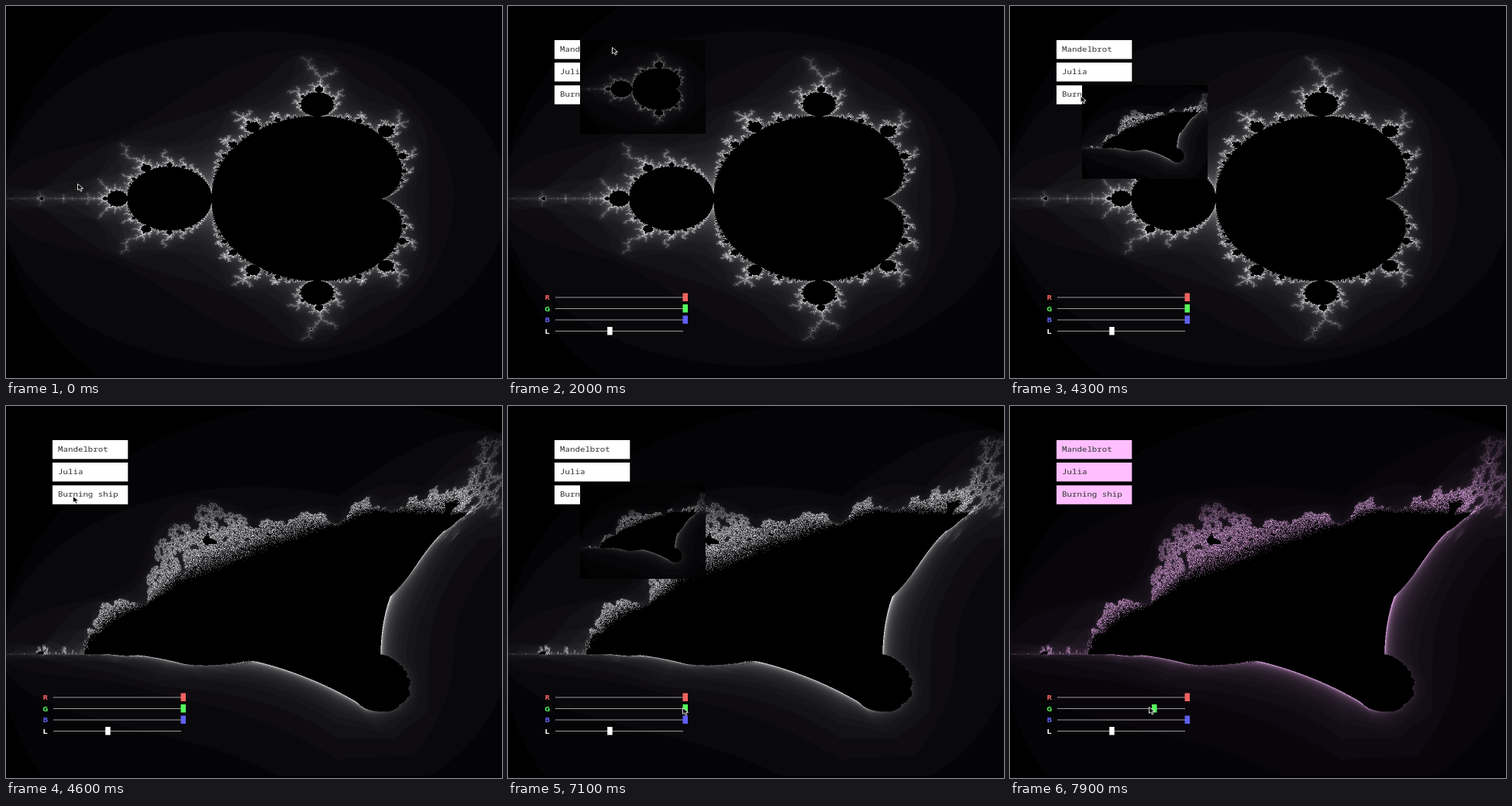
These frames come from a looping animation (640 px wide and 480 px high, 8000 ms). An HTML page with a canvas:

```html
<!DOCTYPE html>
<html lang="en">
<head>
<meta charset="utf-8">
<title>Fractal explorer</title>
<style>
html, body { margin: 0; width: 100%; height: 100%; overflow: hidden; background: #000; }
canvas { display: block; width: 640px; height: 480px; }
</style>
</head>
<body>
<canvas id="stage" width="640" height="480"></canvas>
<script>
const W = 640, H = 480, LOOP = 8000, STEP = 100;
const MAX_ITER = 80, GAIN = 4.5, SAMPLES = 2;
const SCALE_X = 217.7, SCALE_Y = 163.3;
const ASPECT = 4 / 3; // the interface is laid out in 4:3 pixels
const THUMB = { x: 93, w: 162, h: 121 };

const ctx = document.getElementById('stage').getContext('2d');

const FRACTALS = {
  mandelbrot: { label: 'Mandelbrot', top: 44, x0: 428.5, y0: 248.2 },
  julia: { label: 'Julia', top: 73, x0: 320, y0: 239, c: [-0.7, 0.27015] },
  ship: { label: 'Burning ship', top: 102.4, x0: 428.5, y0: 320.2, fold: true }
};

function escapeTime(f, px, py) {
  let x = (px - f.x0) / SCALE_X, y = (py - f.y0) / SCALE_Y;
  const [cx, cy] = f.c || [x, y];
  for (let n = 0; n < MAX_ITER; n++) {
    const xx = x * x, yy = y * y;
    if (xx + yy > 4) return n;
    const xy = 2 * x * y;
    x = xx - yy + cx;
    y = (f.fold ? Math.abs(xy) : xy) + cy;
  }
  return 0;
}

// Mean brightness of one pixel that covers zoom x zoom stage units.
function shade(f, x, y, zoom) {
  let sum = 0;
  for (let j = 0; j < SAMPLES; j++) {
    for (let i = 0; i < SAMPLES; i++) {
      const n = escapeTime(f, (x + i / SAMPLES) * zoom, (y + j / SAMPLES) * zoom);
      sum += Math.min(255, GAIN * n);
    }
  }
  return sum / SAMPLES ** 2;
}

function render(f, w, h) {
  const canvas = document.createElement('canvas');
  canvas.width = w;
  canvas.height = h;
  const g = canvas.getContext('2d');
  const img = g.createImageData(w, h);
  for (let y = 0, i = 0; y < h; y++) {
    for (let x = 0; x < w; x++, i += 4) {
      const v = shade(f, x, y, W / w);
      img.data[i] = v;
      img.data[i + 1] = v - 1;
      img.data[i + 2] = v && v + 2;
      img.data[i + 3] = 255;
    }
  }
  g.putImageData(img, 0, 0);
  return canvas;
}

const full = {
  mandelbrot: render(FRACTALS.mandelbrot, W, H),
  ship: render(FRACTALS.ship, W, H)
};
const thumbs = {};
for (const key in FRACTALS) thumbs[key] = render(FRACTALS[key], THUMB.w, THUMB.h);

// [time, x, y]
const CURSOR = [
  [0, 92, 229], [500, 93, 228], [700, 104, 122], [900, 130, 92], [1100, 142, 79],
  [1400, 143, 78], [1600, 138, 66], [2000, 134, 53], [2200, 134, 54], [2500, 130, 75],
  [3000, 125, 94], [3300, 123, 113], [3600, 123, 115], [4400, 86, 116], [5200, 86, 116],
  [5500, 200, 366], [5700, 202, 367], [6100, 229, 382], [6500, 225, 389],
  [7200, 225, 389], [7900, 179, 388]
];

// [time, preview shown from then on]
const HOVER = [
  [0, null], [600, 'ship'], [800, 'julia'], [1600, 'mandelbrot'], [2500, 'julia'],
  [3200, 'ship'], [4600, null], [5300, 'ship'], [7400, null]
];
const SELECT_AT = 4600;
const DRAG = { from: 7200, to: 7900, x0: 228.5, x1: 186 };

const clamp = v => Math.max(0, Math.min(1, v));
const mix = (a, b, k) => a + (b - a) * k;

function cursorAt(t) {
  let i = 0;
  while (i < CURSOR.length - 2 && CURSOR[i + 1][0] <= t) i++;
  const [ta, xa, ya] = CURSOR[i], [tb, xb, yb] = CURSOR[i + 1];
  const k = clamp((t - ta) / (tb - ta));
  return [mix(xa, xb, k), mix(ya, yb, k)];
}

function label(text, x, y, color, font) {
  ctx.save();
  ctx.translate(x, y);
  ctx.scale(ASPECT, 1);
  ctx.font = font + ' "Noto Sans Mono", "DejaVu Sans Mono", monospace';
  ctx.textBaseline = 'alphabetic';
  ctx.fillStyle = color;
  ctx.fillText(text, 0, 0);
  ctx.restore();
}

function drawButtons(tint) {
  for (const key in FRACTALS) {
    const { label: text, top } = FRACTALS[key];
    ctx.fillStyle = tint;
    ctx.fillRect(60, top, 97.3, 24.4);
    label(text, 67, top + 14.5, '#333', '500 8.1px');
  }
}

function drawSlider(name, y, x, color) {
  label(name, 47.5, y + 3.2, color, 'bold 8.3px');
  ctx.fillStyle = '#999';
  ctx.fillRect(61, y - 0.5, 165, 1);
  ctx.fillStyle = color;
  ctx.fillRect(x - 3, y - 5.5, 6.5, 10.5);
}

function drawThumb(key, selected) {
  const top = Math.floor(FRACTALS[key].top);
  ctx.drawImage(thumbs[key], THUMB.x, top);
  if (key === selected) {
    ctx.fillStyle = 'rgba(0,0,0,0.3)';
    ctx.fillRect(THUMB.x, top, THUMB.w, THUMB.h);
  }
}

function drawCursor(x, y) {
  ctx.save();
  ctx.translate(x + 0.5, y + 0.5);
  ctx.beginPath();
  [[0, 0], [0, 8], [2.2, 6.4], [3.8, 9.6], [5.4, 9], [4, 6], [7, 5.8]]
    .forEach(p => ctx.lineTo(...p));
  ctx.closePath();
  ctx.fillStyle = '#000';
  ctx.fill();
  ctx.strokeStyle = '#ddd';
  ctx.lineWidth = 1;
  ctx.stroke();
  ctx.restore();
}

function draw(time) {
  const t = Math.floor(time % LOOP / STEP) * STEP;
  const selected = t < SELECT_AT ? 'mandelbrot' : 'ship';
  const greenX = mix(DRAG.x0, DRAG.x1, clamp((t - DRAG.from) / (DRAG.to - DRAG.from)));
  const green = Math.round(255 * (greenX - 61) / (DRAG.x0 - 61));
  const tint = `rgb(255,${green},255)`;

  ctx.drawImage(full[selected], 0, 0);
  ctx.globalCompositeOperation = 'multiply';
  ctx.fillStyle = tint;
  ctx.fillRect(0, 0, W, H);
  ctx.globalCompositeOperation = 'source-over';
  ctx.fillStyle = '#000';
  ctx.fillRect(0, 477, W, 3);

  ctx.globalAlpha = clamp(t / 300);
  drawButtons(tint);
  drawSlider('R', 376, 228.5, '#ee6260');
  drawSlider('G', 390.5, greenX, '#55fa5c');
  drawSlider('B', 405, 228.5, '#605ff2');
  drawSlider('L', 419.5, 131.2, '#fff');
  ctx.globalAlpha = 1;

  const hover = HOVER.filter(h => h[0] <= t).pop()[1];
  if (hover) drawThumb(hover, selected);
  drawCursor(...cursorAt(t));
}

const start = performance.now();
function tick() {
  draw(performance.now() - start);
  requestAnimationFrame(tick);
}
tick();
</script>
</body>
</html>
```
